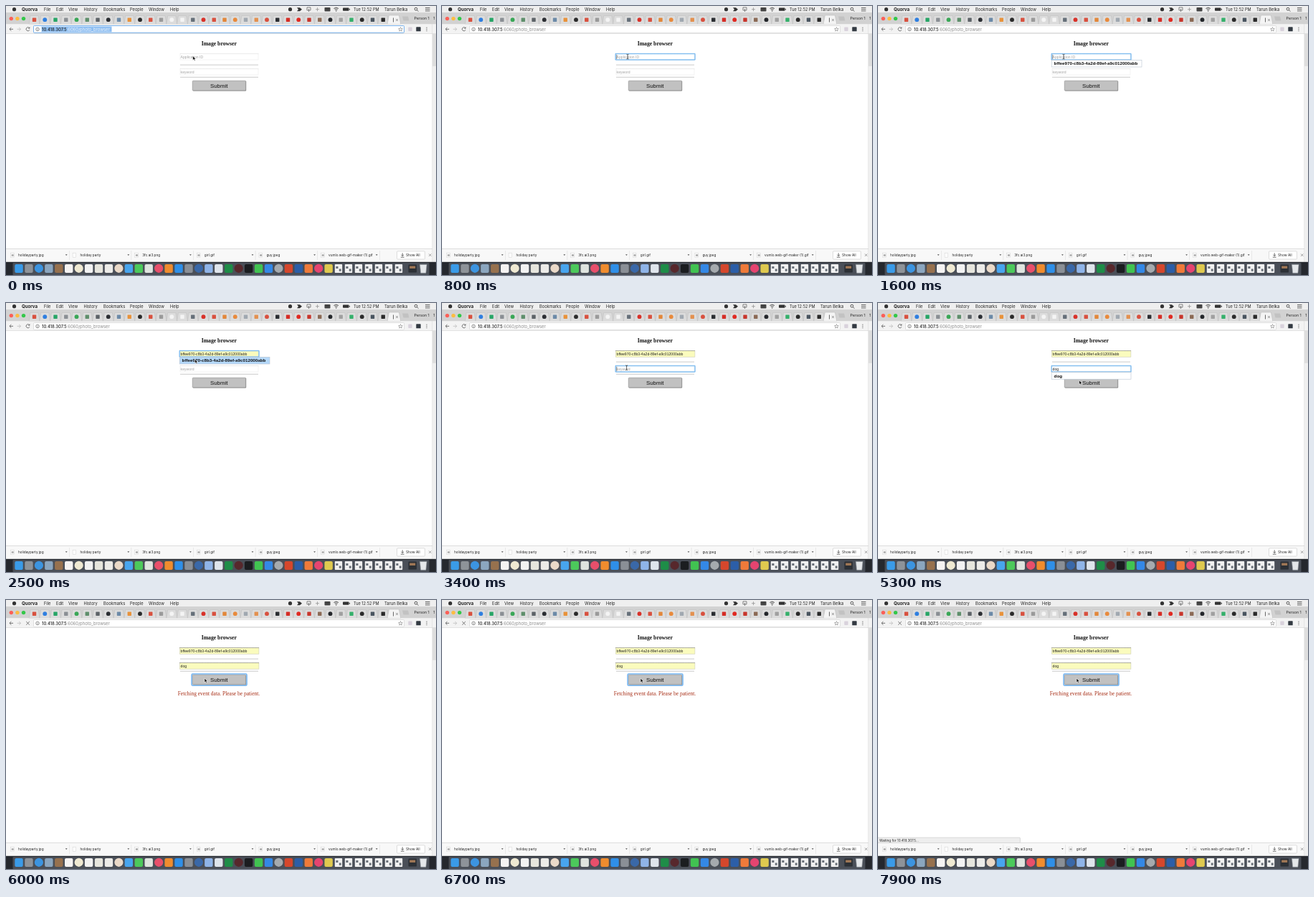
Recreate the animation shown at these times as an HTML page. Size 600 px wide and 375 px high, loop 8 s.

```html
<!DOCTYPE html>
<html lang="en">
<head>
<meta charset="utf-8">
<title>Image browser</title>
<style>
  html, body { margin: 0; width: 100%; height: 100%; overflow: hidden; background: #fff; }
  svg { display: block; width: 600px; height: 375px; }
  text { white-space: pre; }
</style>
</head>
<body>
<svg id="stage" viewBox="0 0 600 375" xmlns="http://www.w3.org/2000/svg"></svg>
<script>
const LOOP = 8000, STEP = 100;
const UI = 'Inter, Roboto, sans-serif';
const SANS = '"Liberation Sans", Arial, sans-serif';
const SERIF = '"Liberation Serif", "Times New Roman", serif';
const HOST = '10.418.307.5';
const PATH = ':6060/photo_browser';
const APP_ID = 'bffee970-c8b3-4a2d-89ef-a9c012000abb';

const stage = document.getElementById('stage');
const parts = [];
let layer = stage;

function add(tag, attrs, parent = layer) {
  const node = document.createElementNS('http://www.w3.org/2000/svg', tag);
  for (const key in attrs) node.setAttribute(key, attrs[key]);
  return parent.appendChild(node);
}
const rect = (x, y, width, height, fill, more) => add('rect', { x, y, width, height, fill, ...more });
const dot = (cx, cy, r, fill, more) => add('circle', { cx, cy, r, fill, ...more });
const line = (d, stroke, width = 0.8, more) =>
  add('path', { d, stroke, fill: 'none', 'stroke-width': width, ...more });
const shape = (d, fill, more) => add('path', { d, fill, ...more });
function text(x, y, str, size, more) {
  const node = add('text', { x, y, 'font-size': size, 'font-family': UI, fill: '#222', ...more });
  node.textContent = str;
  return node;
}

// Draws a group that is shown only between two times.
function during(from, to, draw) {
  const outer = layer;
  const node = layer = add('g', {}, outer);
  draw();
  layer = outer;
  parts.push({ node, from, to });
}

function menuBar() {
  rect(0, 0, 600, 10, '#efefef');
  rect(0, 9.4, 600, 0.6, '#c4c4c4');
  dot(11.5, 4.7, 2.6, '#333');
  text(22, 6.9, 'Quorva', 6.1, { 'font-weight': 700 });
  const items = { File: 53, Edit: 70, View: 87, History: 108.5, Bookmarks: 136, People: 173, Window: 199, Help: 229 };
  for (const name in items) text(items[name], 6.9, name, 5.7);
  dot(396.5, 4.7, 2.6, '#333');
  shape('M406 2.2h4l3 2.5-3 2.5h-4l2-2.5z', '#333');
  line('M420 2h5v4h-5zM422.5 4v4', '#555', 0.7);
  line('M432 4.7h5M434.5 2.2v5', '#888', 0.7);
  rect(444.5, 2, 8, 5.6, '#444', { rx: 0.8 });
  line('M457.5 3.5q3.2-2.6 6.4 0M458.8 5.1q1.9-1.6 3.8 0', '#333', 0.9);
  dot(460.7, 6.7, 0.8, '#333');
  rect(470, 2.6, 8.5, 4.2, '#333', { rx: 0.8 });
  rect(479, 3.8, 0.9, 1.8, '#333');
  text(485, 6.9, 'Tue 12:52 PM', 5.6);
  text(528, 6.9, 'Tarun Belka', 5.8);
  dot(572, 4.2, 1.9, 'none', { stroke: '#333', 'stroke-width': 0.8 });
  line('M573.4 5.6l2 2', '#333');
  line('M585 2.5h6.5M585 4.7h6.5M585 6.9h6.5', '#444', 0.8);
}

function tabStrip() {
  rect(0, 10, 600, 15.5, '#d2d2d2');
  ['#fb5f57', '#fdbc40', '#34c84a'].forEach((c, i) => dot(7.3 + 8.6 * i, 17.6, 2.7, c));
  const icons = ('#d8513f #2f7fe0 #27a566 #8a8f94 #3aa757 #5f8f6c #5d6368 #2b2e33 #6c8aa8 #e8923a #2b2b2b ' +
    '#d8513f #9a9a9a #f4f4f4 #f4f4f4 #66707a #d8322a #d8513f #e2873a #e88a3c #a0a8b0 #e39150 ' +
    '#d8513f #2a2d31 #d52d26 #e02a22 #c8362c #8b6a55 #24272b #a0a0a0 #35b06b #2b2b2b #4a5560 #2b2b2b').split(' ');
  icons.forEach((color, i) => {
    const x = 39.5 + 14.75 * i;
    shape(`M${x - 7.4} 25.5l1.8-12h11.2l1.8 12z`, '#dcdcdc', { stroke: '#bcbcbc', 'stroke-width': 0.5 });
    if (i % 3 == 1) dot(x, 19.2, 2.9, color);
    else rect(x - 2.7, 16.5, 5.4, 5.4, color, { rx: 0.6 });
  });
  shape('M532 25.5l2.4-12.5h14l2.4 12.5z', '#f4f4f4', { stroke: '#b4b4b4', 'stroke-width': 0.5 });
  line('M540.5 16.5v6', '#444', 0.8);
  line('M544 18l3 3M547 18l-3 3', '#666', 0.7);
  shape('M553 14.5h8l1.5 6h-8z', '#c2c2c2');
  text(569.5, 19.2, 'Person 1', 5.3);
}

function address(pathColor) {
  const url = text(50, 34.5, HOST, 5.9, { 'font-weight': 500 });
  add('tspan', { fill: pathColor, 'font-weight': 400 }, url).textContent = PATH;
}

function toolbar() {
  rect(0, 25.5, 600, 13, '#f3f3f3');
  rect(0, 38.2, 600, 0.6, '#c6c6c6');
  line('M10 32.3h-5M7.3 30l-2.4 2.3 2.4 2.3', '#666', 0.9);
  line('M15.5 32.3h5M18.2 30l2.4 2.3-2.4 2.3', '#c2c2c2', 0.9);
  during(0, 5900, () => {
    line('M32.5 30.6a2.5 2.5 0 1 0 .4 2.6', '#666', 0.9);
    shape('M33.3 29v2.6h-2.6z', '#666');
  });
  during(5900, LOOP, () => line('M28.2 30l4.6 4.6M32.8 30l-4.6 4.6', '#666', 0.9));
  rect(38.5, 27.5, 517, 9.8, '#fff', { rx: 1, stroke: '#cfcfcf', 'stroke-width': 0.6 });
  during(0, 500, () => {
    rect(38.5, 27.5, 517, 9.8, 'none', { rx: 1, stroke: '#79b3ee', 'stroke-width': 1 });
    rect(49.5, 28.6, 98, 7.7, '#8fbff2');
    address('#eef4fb');
  });
  during(500, LOOP, () => address('#8a8a8a'));
  dot(44, 32.4, 2.3, 'none', { stroke: '#666', 'stroke-width': 0.7 });
  line('M44 32v1.7M44 30.9v.5', '#666', 0.7);
  shape('M550.5 29.6l.8 1.9 2 .2-1.5 1.3.5 2-1.8-1.1-1.8 1.1.5-2-1.5-1.3 2-.2z', 'none',
    { stroke: '#777', 'stroke-width': 0.6 });
  rect(561.3, 29.6, 5.4, 5.4, '#d9d2dc', { rx: 1 });
  rect(572.3, 29.3, 6.4, 6, '#333a42', { rx: 0.6 });
  [30.2, 32.4, 34.6].forEach(y => dot(587, y, 0.65, '#666'));
}

const underline = y => rect(243, y, 109, 0.8, '#bdbdbd');
function field(y) {
  rect(243, y, 109, 8.4, '#fff', { stroke: '#ececec', 'stroke-width': 0.6 });
  line(`M243 ${y}h109`, '#d8d8d8', 0.6, { 'stroke-dasharray': '1 1' });
}
function filled(y) {
  rect(242.3, y, 110.6, 8.6, '#fafbbd', { stroke: '#d0d0b8', 'stroke-width': 0.6 });
  line(`M242.3 ${y}h110.6`, '#777', 0.8, { 'stroke-dasharray': '1.2 .9' });
}
function ring(y) {
  rect(242.2, y, 110.8, 8.4, 'none', { stroke: '#9ccdf6', 'stroke-width': 1.5, rx: 0.6 });
  rect(242.2, y, 110.8, 8.4, 'none', { stroke: '#4f9ee0', 'stroke-width': 0.7, 'stroke-dasharray': '1 1' });
}
const entry = (y, str, fill = '#222') => text(243.6, y, str, 5.12, { 'font-family': SANS, fill });
const choice = (y, str) => text(245.6, y, str, 6.24, { 'font-family': SANS, 'font-weight': 700, fill: '#111' });
function popup(y, w, h, fill, str) {
  rect(242.2, y, w, h, fill, { stroke: '#b8c4d0', 'stroke-width': 0.6 });
  choice(y + 6.9, str);
}
function blink(from, to, x, y) {
  for (let t = from; t < to; t += 1000)
    during(t, Math.min(t + 500, to), () => line(`M${x} ${y}v6.2`, '#222', 0.5));
}

function page() {
  rect(0, 38.8, 595, 299.5, '#fff');
  text(297.3, 55.3, 'Image browser', 7.7,
    { 'font-family': SERIF, 'font-weight': 700, 'text-anchor': 'middle', fill: '#111' });

  field(66.6);
  underline(81.7);
  field(87.6);
  underline(98.8);

  during(0, 2200, () => entry(72.8, 'Application ID', '#a2a2a2'));
  during(2200, LOOP, () => { filled(66.6); entry(72.7, APP_ID); });
  during(500, 3200, () => ring(66.6));
  blink(500, 2200, 243.8, 67.8);

  during(0, 4100, () => entry(93.8, 'keyword', '#a2a2a2'));
  during(5800, LOOP, () => filled(87.6));
  during(3200, 5800, () => ring(87.6));
  blink(3200, 4100, 243.8, 88.8);
  ['d', 'do', 'dog'].forEach((str, i) =>
    during(4100 + 200 * i, i == 2 ? LOOP : 4300 + 200 * i, () => entry(93.7, str)));

  rect(260.6, 104.6, 74.6, 14, '#858585', { rx: 1 });
  rect(260.2, 104.2, 74.2, 13.6, '#c1c1c1', { rx: 1, stroke: '#999', 'stroke-width': 0.6 });
  during(5800, LOOP, () => {
    rect(259.1, 103, 76.9, 16.2, 'none', { rx: 1.4, stroke: '#74b5f2', 'stroke-width': 1.6 });
  });
  text(297.2, 114, 'Submit', 7.9, { 'font-family': SANS, 'text-anchor': 'middle', fill: '#111' });

  during(1500, 2200, () => popup(75.4, 125.8, 9.6, '#fff', APP_ID));
  during(2200, 2800, () => popup(75.4, 125.8, 9.6, '#b4d8fa', APP_ID));
  during(4100, 5800, () => popup(96.6, 110.8, 9.6, '#fff', 'dog'));

  during(6000, LOOP, () =>
    text(239.7, 133.3, 'Fetching event data. Please be patient.', 7.49, { 'font-family': SERIF, fill: '#a83018' }));
  during(7600, LOOP, () => {
    rect(-1, 331.2, 199.4, 7.4, '#eee', { rx: 1, stroke: '#c4c4c4', 'stroke-width': 0.6 });
    text(2, 336.6, `Waiting for ${HOST}...`, 4.6);
  });
}

function downloads() {
  rect(0, 338.4, 595, 18.4, '#f8f8f8');
  rect(0, 338.2, 595, 0.6, '#cacaca');
  const names = ['holidayparty.jpg', 'holiday party', '3fc.ai3.png', 'girl.gif', 'guy.jpeg',
    'vumlo.web-gif-maker (1).gif'];
  names.forEach((name, i) => {
    const x = 86.6 * i;
    rect(x + 6.5, 344.2, 4.6, 6, '#fff', { stroke: '#cfcfcf', 'stroke-width': 0.5 });
    if (i != 1) rect(x + 7.7, 346.2, 3, 2.6, '#aaa');
    text(x + 17, 348.8, name, 4.7);
    shape(`M${x + 82.8} 346.2h2.8l-1.4 1.8z`, '#555');
    rect(x + 88, 341, 0.5, 13, '#d8d8d8');
  });
  rect(545.5, 341.8, 39, 11.2, '#fff', { rx: 1.2, stroke: '#c6c6c6', 'stroke-width': 0.6 });
  line('M553.2 344.4v4M551.4 346.8l1.8 1.8 1.8-1.8M550.8 350.2h4.8', '#444', 0.8);
  text(558, 349, 'Show All', 4.8);
  line('M590 345.5l3.4 3.4M593.4 345.5l-3.4 3.4', '#777', 0.7);
}

function sideWindow() {
  rect(595, 38.8, 5, 318, '#f0f0f0');
  rect(595, 38.8, 5, 45, '#dedede');
  rect(594.6, 10, 0.5, 346.8, '#d4d4d4');
  text(596.3, 19.2, '1', 5.3);
}

function dock() {
  rect(0, 356.8, 600, 18.2, '#25282e');
  rect(9.5, 358, 581, 17, '#4a4f58', { rx: 1 });
  const icons = ('#3a9be8 #8e9399 #3c94e0 #8ba6bf #97714e #f5f3f2 #efe9d2 #f2f2f2 #e6e5dd #ecebe8 #ead9c8 ' +
    '#48a5ee #4cc95b #dfe4df #e84f6b #f08c2e #2f8fe8 #8a8f96 #3a68a8 #8fb4e8 #dfe5ec #1e8d48 ' +
    '#57282c #1b1d20 #41c351 #3488e6 #a5aaae #d5472c #2c5ea8 #ef7a3a #e64470 #dfc94f').split(' ');
  icons.forEach((color, i) => {
    const x = 18 + 13.94 * i;
    if (i % 4 == 2) dot(x, 365.8, 6.1, color);
    else rect(x - 5.7, 359.9, 11.4, 12, color, { rx: 2 });
  });
  for (let x = 464; x < 552; x += 14) {
    rect(x - 5.2, 359.9, 10.4, 12.2, '#f1f1f1', { rx: 0.8 });
    shape(`M${x - 3.6} 363h3v3h-3zM${x + 0.8} 366.4h2.8v3.4h-2.8z`, '#666d76');
  }
  rect(561.5, 360.6, 11.5, 11, '#2b2f35', { rx: 1 });
  rect(563.2, 362.5, 8, 3.4, '#a17856');
  shape('M577.5 360.4h9.6l-1.2 11.8h-7.2z', '#e4e7ea', { stroke: '#969ba2', 'stroke-width': 0.6 });
}

menuBar();
tabStrip();
toolbar();
page();
downloads();
sideWindow();
dock();

const pointer = layer = add('g', {});
const edge = { stroke: '#fff', 'stroke-width': 0.6 };
const looks = {
  arrow: shape('M0 0v6l1.4-1.2 1 2.2 1.1-.5-1-2.1h1.8z', '#111', edge),
  beam: line('M-1.5 -3.3q1.5 0 1.5 1v4.6q0 1-1.5 1M1.5 -3.3q-1.5 0-1.5 1M0 2.3q0 1 1.5 1', '#222', 0.7)
};

// time, x, y
const moves = [
  [0, 260.6, 69.5], [200, 260.6, 69.5], [500, 259, 70.7], [1700, 259, 70.7], [2200, 263.4, 78],
  [2800, 263.4, 78], [3200, 257.6, 90.2], [4700, 257.6, 90.2], [5200, 280.6, 107.6],
  [5400, 280.6, 107.6], [5700, 277, 109], [8000, 277, 109]
];
// start time, look
const cursors = [
  [0, 'arrow'], [400, 'beam'], [1900, 'arrow'], [3000, 'beam'], [4100, ''], [4700, 'beam'], [4900, 'arrow']
];

function render(t) {
  for (const { node, from, to } of parts)
    node.style.display = t >= from && t < to ? '' : 'none';
  const i = moves.findIndex(m => m[0] > t);
  const [t0, x0, y0] = moves[i - 1], [t1, x1, y1] = moves[i];
  const k = (t - t0) / (t1 - t0), e = k * k * (3 - 2 * k);
  pointer.setAttribute('transform', `translate(${x0 + (x1 - x0) * e} ${y0 + (y1 - y0) * e})`);
  const look = cursors.filter(c => c[0] <= t).pop()[1];
  for (const name in looks) looks[name].style.display = name == look ? '' : 'none';
}

const start = performance.now();
function tick() {
  const t = (performance.now() - start) % LOOP;
  render(Math.floor(t / STEP) * STEP);
  requestAnimationFrame(tick);
}
tick();
</script>
</body>
</html>
```
